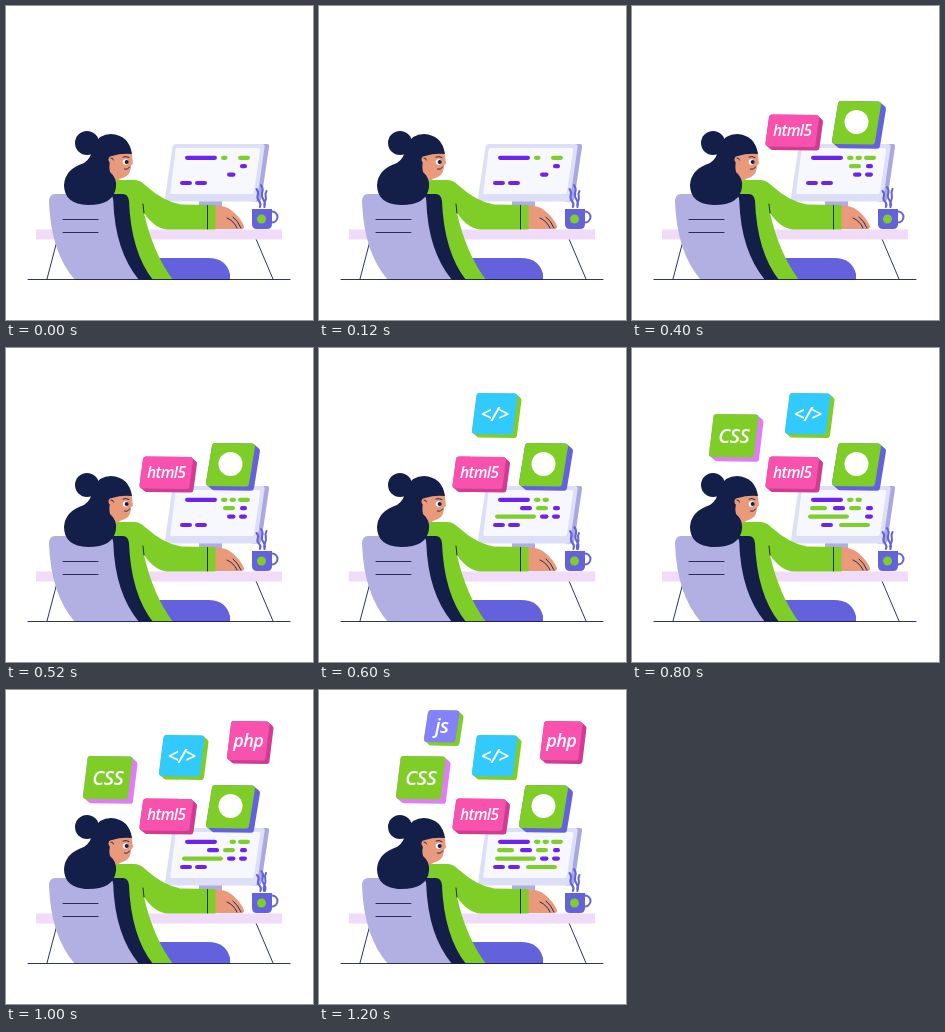
Animation, 307 px wide and 314 px high, one loop 1400 ms. Source, as an HTML page:

```html
<!DOCTYPE html>
<html lang="en">
<head>
<meta charset="utf-8">
<title>Coding at a desk</title>
<style>
  html, body { margin: 0; width: 100%; height: 100%; overflow: hidden; background: #fff; }
  svg { display: block; width: 100%; height: 100%; }
  text {
    font-family: "Open Sans", "Noto Sans", sans-serif;
    font-style: italic; font-weight: 600; letter-spacing: -.6px;
    fill: #fff; text-anchor: middle;
  }
  .thin { fill: none; stroke: #16204c; stroke-width: .9; stroke-linecap: round; }
  .navy { fill: #141f49; }
  .green { fill: #7fce28; }
  .blue { fill: #6361dc; }
  .skin { fill: #e99a7b; }
</style>
</head>
<body>
<svg viewBox="0 0 307 314">
  <!-- desk and floor -->
  <path class="thin" d="M51.500 233L41 273M250 233L267 273"/>
  <path fill="#f0dcf8" d="M30 223.500H276V233.500H30Z"/>

  <!-- monitor -->
  <path fill="#b0ade4" d="M193 194H216V201H193Z"/>
  <path fill="#aaa7e1" d="M255 138H261Q263.500 138 263 141L255.500 192Q255 195.500 252 195.500H246Z"/>
  <path fill="#dddff7" d="M170 138H256Q259 138 258.600 141L251.300 192Q250.800 195.500 248 195.500H162Q158.600 195.500 159 192L166.500 141Q167 138 170 138Z"/>
  <path fill="#f7f8fe" d="M171.500 142H252.500Q254.500 142 254.200 144L248 186Q247.700 188 245.500 188H166Q164 188 164.300 186L169.500 144Q169.700 142 171.500 142Z"/>
  <g id="code"></g>

  <!-- mug -->
  <circle cx="266" cy="211" r="5.500" fill="none" stroke="#6361dc" stroke-width="2"/>
  <path class="blue" d="M246 203H266V218Q266 223 261 223H251Q246 223 246 218Z"/>
  <circle class="green" cx="255.500" cy="213" r="4.500"/>
  <path id="steam" fill="none" stroke="#6361dc" stroke-width="2" stroke-linecap="round"/>

  <!-- person -->
  <path class="blue" d="M145 252H202Q220 252 224 268V274H145Z"/>
  <path class="skin" d="M208 199.500Q219 199 225 204Q234 211 238 220Q238.500 223 235 223H208Z"/>
  <path class="thin" d="M221 212Q228 215 231 222M227 211Q232 215 235 222"/>
  <path class="green" d="M106 174H128Q134 174 139 179Q158 196 175 198.500L209.500 199V223.500H162Q149 223 138 207Q147 247 167 274H138L108 200Z"/>
  <path class="thin" d="M201.500 199.500V223M138 207L137 198"/>
  <path class="navy" d="M90 188H117Q122 188 123 195Q125 246 147 274H110Z"/>
  <path fill="#b2afe3" d="M49 188H102Q107 188 107.300 195Q109 245 133 274H69Q45 247 43 196Q43 188 49 188Z"/>
  <path class="thin" d="M57 213.500H92M57 226.500H92"/>

  <!-- head -->
  <path class="skin" d="M102 146H125.500L127 157.500L125 159.500Q125 168 119 171Q114 172.500 111 175L102 176Z"/>
  <circle class="navy" cx="81" cy="137" r="12"/>
  <path class="navy" d="M88 139Q93 128 105 128Q123 129 126 148Q115 147 106 150Q102 158 104 166Q111 172 110 181Q108 199 82 199Q58 198 58 179Q59 163 78 157Q85 153 88 139Z"/>
  <circle class="skin" cx="106" cy="153.500" r="3.500"/>
  <path class="thin" d="M105 152Q107 151.500 107.500 154M117 151Q120 149.800 123 151.500M118.500 163Q122 164 123.500 161"/>
  <circle cx="119.500" cy="156" r="2.800" fill="#fff"/>
  <circle class="navy" cx="120.700" cy="156" r="2"/>
  <path class="thin" d="M22 273.500H284"/>
  <g id="tiles"></g>
</svg>
<script>
const STEP = 200, STEPS = "0123456";
const $ = id => document.getElementById(id);
const timed = [];

function add(parent, tag, attrs, text) {
  const el = document.createElementNS("http://www.w3.org/2000/svg", tag);
  for (const k in attrs) el.setAttribute(k, attrs[k]);
  if (text) el.textContent = text;
  return parent.appendChild(el);
}

// code line: steps shown, row, left, right, colour
const PURPLE = "#6c24ea", LIME = "#80ce29";
[
  [STEPS, 0, 179, 211, PURPLE], ["012346", 0, 215, 221.5, LIME],
  ["23456", 0, 223.5, 230, LIME], ["01256", 0, 232, 244, LIME],
  ["46", 1, 178, 195, LIME], ["3456", 1, 201, 213, PURPLE],
  ["23456", 1, 217, 229, LIME], [STEPS, 1, 234, 241, PURPLE],
  ["3456", 2, 176, 217, LIME], ["012356", 2, 221, 229.5, PURPLE], ["23456", 2, 233, 241, PURPLE],
  ["012356", 3, 174, 186, PURPLE], [STEPS, 3, 189, 201, PURPLE], ["46", 3, 207, 238, LIME]
].forEach(([steps, row, x, right, fill]) => {
  const el = add($("code"), "rect", { x, y: 149.7 + row * 8.4, width: right - x, height: 4.2, rx: 2.1, fill });
  timed.push([steps, el]);
});

// tile: first step, left, top, width, height, lean, depth, face, side, label, size
[
  [1, 206, 95, 43, 43, 6, 5, "#7fce28", "#6361dc"],
  [2, 137, 108.5, 50, 32, 3.5, 4, "#f951ae", "#cf3d92", "html5", 15.5],
  [3, 157.5, 45, 41, 41, 4.5, 4, "#32cafd", "#7fce28", "</>", 20],
  [4, 81.5, 66, 45, 43, 4.5, 5, "#7fce28", "#e07cf8", "CSS", 20],
  [5, 225, 31, 38.5, 39, 4, 4, "#f951ae", "#cf3d92", "php", 18],
  [6, 109, 20, 31.5, 32, 4, 4, "#8481fa", "#7fce28", "js", 20]
].forEach(([from, x, y, w, h, lean, depth, face, side, label, size]) => {
  const g = add($("tiles"), "g", {}), r = 3, tilt = .6;
  const l = x + r, t = y + r, R = x + w - r, b = y + h - r;
  const shape = (pts, fill) => add(g, "polygon", {
    points: pts.join(" "), fill, stroke: fill, "stroke-width": 2 * r, "stroke-linejoin": "round"
  });
  const tl = [l, t], tr = [R, t + tilt], br = [R - lean, b + tilt], bl = [l - lean, b];
  const push = ([px, py]) => [px + depth, py + depth * .85];
  shape([tl, tr, push(tr), push(br), push(bl), bl], side);
  shape([tl, tr, br, bl], face);
  const cx = x + (w - lean) / 2, cy = y + h / 2;
  if (label) add(g, "text", { x: cx, y: cy + size * .35, "font-size": size }, label);
  else add(g, "circle", { cx, cy: cy - .5, r: 12, fill: "#fff" });
  timed.push([STEPS.slice(from), g]);
});

function wisp(x, top, bend) {
  const h = (201 - top) / 3;
  return `M${x} ${top}q${bend} ${h / 2} ${bend / 2} ${h}t${bend / 2} ${h}t${bend / 3} ${h}`;
}

function draw(now) {
  const step = Math.floor(now / STEP) % STEPS.length;
  for (const [steps, el] of timed) {
    el.setAttribute("visibility", steps.includes(step) ? "visible" : "hidden");
  }
  const sway = step % 2 / 2, rise = step % 3;
  $("steam").setAttribute("d",
    wisp(250.5 + sway, 183 + rise, 2.5) +
    wisp(255 + sway, 179 + rise, 2.5) +
    wisp(260.5 - sway, 185 - rise, -1.5));
}

const start = performance.now();
function tick() {
  draw(performance.now() - start);
  requestAnimationFrame(tick);
}
tick();
</script>
</body>
</html>
```
